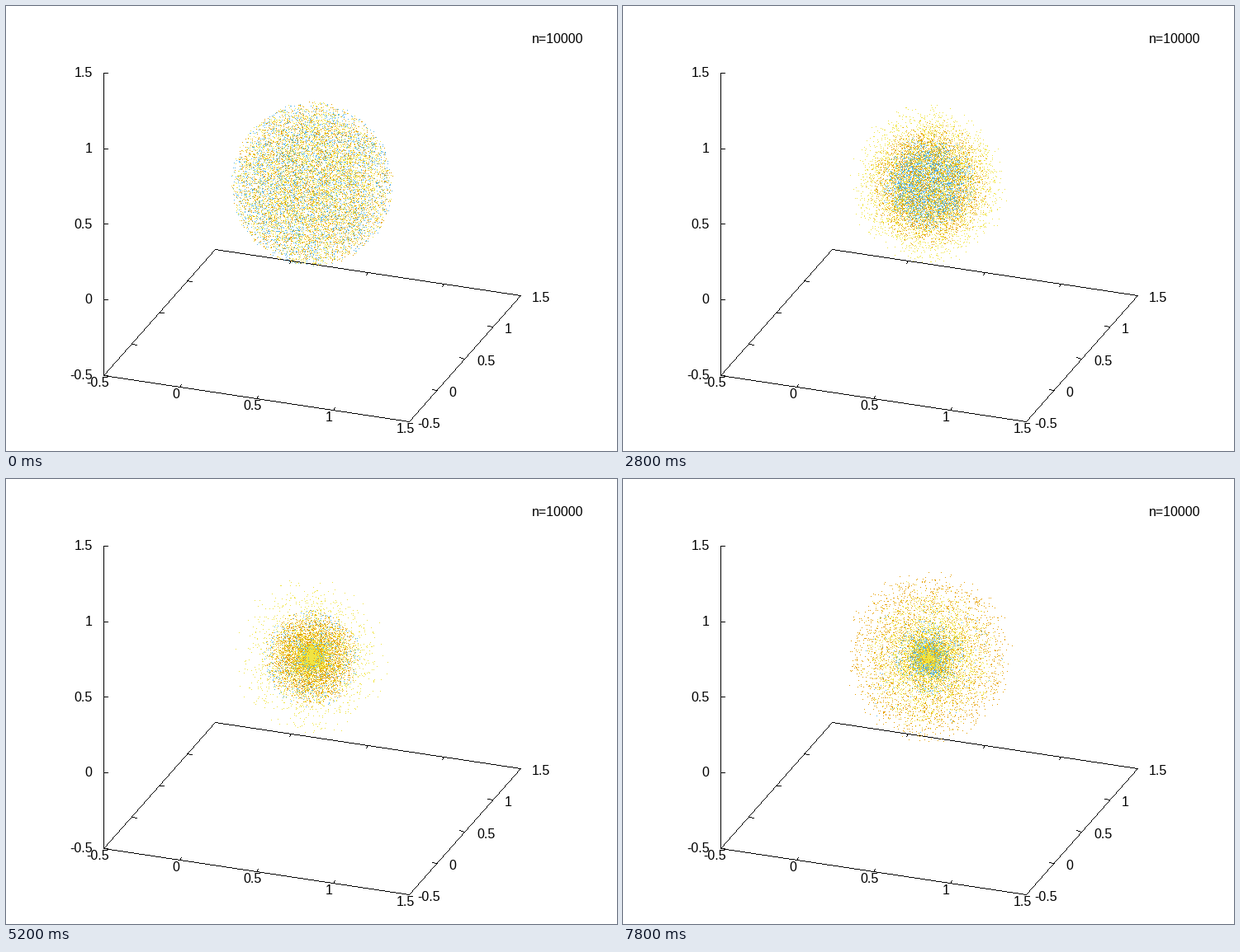
Animation of 740 by 540 pixels, one loop 8 s. Source, as a matplotlib script:

```python
import numpy as np
import matplotlib
import matplotlib.pyplot as plt
from matplotlib.animation import FuncAnimation

W, H, DPI = 740, 540, 100
FRAMES, STEP = 40, 200            # frames, ms per frame
N, R = 10000, 0.5                 # particles, radius of the sphere
K = 1.38e-7                       # pull at the start, per ms^2
SOFT, DT = 0.05, 10
SPACE = 4.4                       # gap kept for the sign of positive labels

matplotlib.rcParams["font.family"] = "Liberation Sans"

# Pixel vectors of one data unit along each axis
ORIGIN = np.array([118.0, 448.0])
EX = np.array([185.0, 28.0])
EY = np.array([67.3, -76.5])
EZ = np.array([0.0, -183.5])
COLORS = np.array([[0x56, 0xB4, 0xE9], [0xE6, 0x9F, 0x00], [0xF0, 0xE4, 0x42]],
                  dtype=np.uint8)


def project(x, y, z):
    """Data coordinates (arrays or scalars) to pixels."""
    x, y, z = (np.asarray(c, dtype=float)[..., None] + 0.5 for c in (x, y, z))
    return ORIGIN + x * EX + y * EY + z * EZ


def collapse(radius, pull):
    """Signed distance from the centre for every frame, under shared gravity."""
    s, v = radius.copy(), np.zeros(N)
    inside = np.empty(N)
    share = (np.arange(N) + 0.5) / N
    path = []
    for _ in range(FRAMES):
        path.append(s.copy())
        for _ in range(STEP // DT):
            inside[np.argsort(np.abs(s))] = share
            v -= DT * pull * K * R**3 * inside * s / (s * s + SOFT**2) ** 1.5
            s += DT * v
    return path


rng = np.random.default_rng(7)
aim = rng.normal(size=(N, 3))
aim /= np.linalg.norm(aim, axis=1)[:, None]
pull = np.sort(rng.random(N))[::-1]          # strong first, weak drawn on top
tint = COLORS[np.minimum(2, np.arange(N) * 3 // N)]
path = collapse(R * rng.random(N) ** (1 / 3), pull)

fig = plt.figure(figsize=(W / DPI, H / DPI), dpi=DPI, facecolor="white")
ax = fig.add_axes([0, 0, 1, 1])
ax.set_xlim(0, W)
ax.set_ylim(H, 0)
ax.axis("off")
box = np.full((H, W, 3), 255, np.uint8)


def line(a, b):
    """One-pixel line without smoothing."""
    a, b = np.rint(a), np.rint(b)
    steps = int(np.abs(b - a).max()) + 1
    col, row = np.rint(np.linspace(a, b, steps)).astype(int).T
    box[row, col] = 0


def label(x, y, text, align):
    ax.text(x, y + 5, text, ha=align, va="baseline", fontsize=16 * 72 / DPI,
            color="black", zorder=3)


corners = [project(x, y, -0.5) for x, y in
           [(-0.5, -0.5), (1.5, -0.5), (1.5, 1.5), (-0.5, 1.5)]]
for i in range(4):
    line(corners[i - 1], corners[i])
line(project(-0.5, -0.5, -0.5), project(-0.5, -0.5, 1.5))

TIC_X, TIC_Y = np.array([6, 1]), np.array([2, -3])
for i in range(5):
    t = -0.5 + 0.5 * i
    name = f"{t:g}"
    gap = SPACE if t >= 0 else 0
    z_tic = project(-0.5, -0.5, t)
    line(z_tic, z_tic + [5, 0])
    if 0 < i < 4:
        for edge, tic in [(project(t, -0.5, -0.5), TIC_Y),
                          (project(t, 1.5, -0.5), -TIC_Y),
                          (project(-0.5, t, -0.5), TIC_X),
                          (project(1.5, t, -0.5), -TIC_X)]:
            line(edge, edge + tic)
    label(104.5, z_tic[1], name, "right")
    label(111.5 + 92.5 * i + gap / 2, 457 + 14 * i, name, "center")
    label(498.5 + 33.5 * i + gap, 507 - 38.2 * i, name, "left")
label(637, 40, "n=10000", "left")

stage = ax.imshow(box, extent=(0, W, H, 0), interpolation="nearest",
                  aspect="auto", zorder=1)


def draw(k):
    pos = 0.5 + aim * path[k][:, None]
    col, row = np.rint(project(*pos.T)).astype(int).T
    image = box.copy()
    image[row, col] = tint
    stage.set_data(image)
    return (stage,)


anim = FuncAnimation(fig, draw, frames=FRAMES, interval=STEP, repeat=True,
                     repeat_delay=0, blit=False)
plt.show()
```
